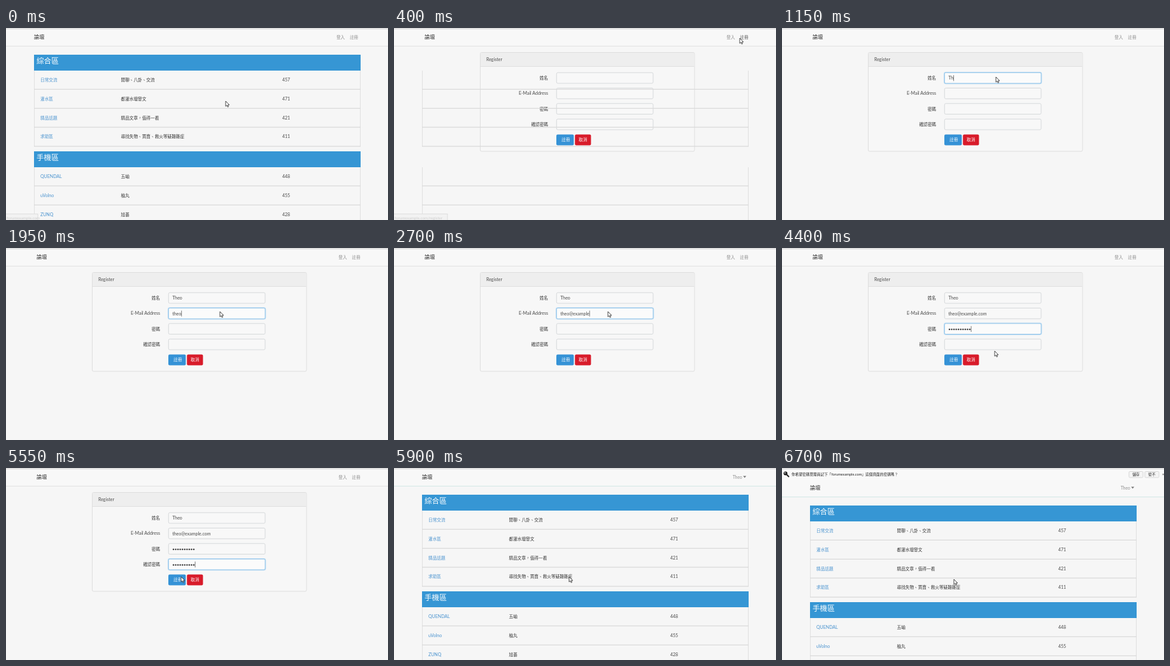
These frames come from a looping animation (600 px wide and 302 px high, 6750 ms). An HTML page:

```html
<!DOCTYPE html>
<html lang="zh-Hant">
<head>
<meta charset="utf-8">
<title>論壇</title>
<style>
html, body { margin: 0; width: 100%; height: 100%; overflow: hidden; background: #f6f6f6; }
svg { display: block; width: 600px; height: 302px; }
text { font-family: Lato, "Noto Sans CJK TC", "Noto Sans CJK", sans-serif; font-size: 7px; fill: #4a4a4a; white-space: pre; }
.zh { font-size: 6.65px; fill: #333; }
.link { fill: #4a93cf; }
.heading { font-size: 11.6px; fill: #fff; font-weight: 300; }
.brand { font-size: 8.2px; fill: #333; }
.nav { font-size: 6.6px; fill: #8d8d8d; }
.white { fill: #fff; }
.end { text-anchor: end; }
.rule { stroke: #dadada; stroke-width: 1.2; fill: none; }
.edge { stroke: #e0e0e0; stroke-width: 1; fill: none; }
.field { fill: #f8f8f8; stroke: #d3d6d9; stroke-width: .9; }
.ring { fill: none; stroke: #b9daf3; stroke-width: 2.6; }
.focus { fill: #fbfbfb; stroke: #8fc3e8; stroke-width: .9; }
.small { font-size: 5.7px; fill: #222; }
.status { font-size: 6.2px; fill: #cfcfcf; }
</style>
</head>
<body>
<svg id="stage" viewBox="0 0 600 302" xmlns="http://www.w3.org/2000/svg"></svg>
<script>
const LOOP = 6750, STEP = 50;
const USER = 'Theo', EMAIL = 'theo@example.com';
const PASSWORD_LENGTH = 10;

const text = (x, y, content, cls = '', id = '') =>
  `<text x="${x}" y="${y}" class="${cls}" id="${id}">${content}</text>`;
const rect = (x, y, w, h, attrs = '') =>
  `<rect x="${x}" y="${y}" width="${w}" height="${h}" ${attrs}/>`;
const line = (x1, y1, x2, y2, cls) =>
  `<path d="M${x1} ${y1}L${x2} ${y2}" class="${cls}"/>`;

// Forum index
const sections = [
  { title: '綜合區', top: 42, rows: [
    ['日常交流', '閒聊、八卦、交流', 457],
    ['灌水區', '都灌水壇發文', 471],
    ['精品話題', '精品文章，值得一看', 421],
    ['求助區', '尋找失物、買賣、救火等疑難雜症', 411]] },
  { title: '手機區', top: 194, rows: [
    ['QUENDAL', '五岫', 448],
    ['uVolno', '柚丸', 455],
    ['ZUNQ', '旭碁', 428]] }
];

const sectionFrame = ({ top, rows }) => {
  const bottom = top + 24.5 + rows.length * 29.9;
  return line(44.5, top + 25, 44.5, bottom, 'edge') +
    line(556.5, top + 25, 556.5, bottom, 'edge') +
    rows.map((_, i) => line(44, top + 24.5 + (i + 1) * 29.9, 557, top + 24.5 + (i + 1) * 29.9, 'rule')).join('');
};

const sectionBody = section => {
  const { title, top, rows } = section;
  return sectionFrame(section) +
    rect(44, top, 513, 25, 'fill="#3696d4"') +
    text(48, top + 14, title, 'heading') +
    rows.map(([name, about, posts], i) => {
      const y = top + 41.6 + i * 29.95;
      const latin = /^\w/.test(name);
      return text(54, y, name, latin ? 'link' : 'zh link') +
        text(180.5, y, about, 'zh') + text(434, y, posts);
    }).join('');
};

// Registration form
const fieldTops = [70.2, 94.5, 118.8, 143.2];
const labels = ['姓名', 'E-Mail Address', '密碼', '確認密碼'];

const formField = (top, i) =>
  text(242, top + 10.9, labels[i], i === 1 ? 'end' : 'zh end') +
  `<g id="ring${i}">${rect(255.3, top, 151.7, 16.8, 'rx="2" class="ring"')}</g>` +
  rect(255.3, top, 151.7, 16.8, `rx="2" class="field" id="box${i}"`) +
  (i < 2 ? text(261.2, top + 11, '', '', `value${i}`) : `<g id="value${i}"></g>`);

const form =
  rect(135.5, 38.5, 336.5, 155.5, 'rx="2" fill="#f7f7f7" stroke="#dedede"') +
  rect(136, 39, 335.5, 21.5, 'rx="1.5" fill="#eeeeee"') +
  line(136, 60.5, 471.5, 60.5, 'edge') +
  text(145, 51.8, 'Register') +
  fieldTops.map(formField).join('') +
  rect(255, 167.4, 27.4, 17.2, 'rx="2" fill="#3592d6"') + text(263, 178.4, '註冊', 'zh white') +
  rect(284.2, 167.4, 25.2, 17.2, 'rx="2" fill="#d81b2a"') + text(290, 178.4, '取消', 'zh white');

const passwordBar =
  rect(0, 2, 600, 17, 'fill="#f9f9f9"') +
  '<circle cx="5.5" cy="8.5" r="3" fill="#222"/><path d="M7 10l4 4" stroke="#222" stroke-width="2"/>' +
  '<circle cx="4.7" cy="7.7" r=".9" fill="#f9f9f9"/>' +
  text(15, 12.2, '你希望密碼管理員記下「forumexample.com」這個頁面的密碼嗎？', 'small') +
  [[545, '儲存'], [570, '從不']].map(([x, label]) =>
    rect(x, 5.5, 22, 9.5, 'rx="1.5" fill="#f5f5f5" stroke="#d0d0d0" stroke-width=".8"') +
    text(x + 5.3, 12.3, label, 'small')).join('') +
  text(597, 12.3, '×', 'small');

const stage = document.getElementById('stage');
stage.innerHTML =
  rect(0, 0, 600, 302, 'fill="#f6f6f6"') +
  '<g id="page">' +
    rect(0, 2, 600, 26, 'fill="#f8f8f8"') +
    `<path id="navLine" d="M0 28.5H600" stroke="#e2e2e2"/>` +
    text(44, 17.3, '論壇', 'brand', 'brand') +
    `<g id="guest">${text(519, 16.6, '登入', 'nav')}${text(540, 16.6, '註冊', 'nav', 'signUp')}</g>` +
    `<g id="member">${text(532, 16.6, USER, 'nav')}<path d="M548.3 12.6h5l-2.5 2.8z" fill="#777"/></g>` +
    `<g id="forum">${sections.map(sectionBody).join('')}</g>` +
    `<g id="form">${form}</g>` +
    `<g id="ghost">${sections.map(sectionFrame).join('')}</g>` +
  '</g>' +
  `<g id="bar">${passwordBar}</g>` +
  rect(0, .6, 600, 1.3, 'fill="#d4d4d4"') +
  `<g id="status">${rect(-1, 292.5, 85, 11, 'id="statusBox" fill="#f2f2f2" stroke="#dedede"')}${text(1, 300.6, '', 'status', 'statusText')}</g>` +
  '<path id="caret" stroke="#444" stroke-width=".7"/>' +
  '<path id="pointer" d="M0 0V8.2L1.9 6.5L3.2 9.3L4.5 8.7L3.3 6H5.8Z" fill="#fff" stroke="#222" stroke-width=".8"/>';

const el = id => document.getElementById(id);
const show = (id, visible) => el(id).setAttribute('visibility', visible ? 'visible' : 'hidden');
const setText = (id, value) => { if (el(id).textContent !== value) el(id).textContent = value; };
const clamp = (v, lo, hi) => Math.min(hi, Math.max(lo, v));

// Pointer stops: time, x, y
const path = [
  [0, 345, 115], [50, 345, 115], [300, 543, 16], [450, 543, 16], [700, 380, 66],
  [900, 336, 77], [1500, 336, 77], [1650, 336, 100], [3000, 336, 100], [3200, 320, 125],
  [4200, 320, 125], [4400, 334, 162], [4600, 346, 149], [5250, 346, 149],
  [5500, 275, 171], [5950, 275, 171], [6100, 270, 175], [LOOP, 270, 175]
];

function pointerAt(t) {
  const i = path.findIndex((stop, k) => k > 0 && t <= stop[0]);
  const [t0, x0, y0] = path[i - 1], [t1, x1, y1] = path[i];
  const p = (t - t0) / (t1 - t0), e = p * p * (3 - 2 * p);
  return [x0 + (x1 - x0) * e, y0 + (y1 - y0) * e];
}

// Characters visible when `count` keys are pressed evenly from start to end
const typed = (t, start, end, count) =>
  t < start ? 0 : clamp(1 + Math.floor((t - start) / (end - start) * (count - 1)), 0, count);

function emailLength(t) {
  return t < 2100 ? typed(t, 1700, 1900, 4) : 4 + typed(t, 2100, 2950, EMAIL.length - 4);
}

function drawDots(i, count) {
  const cy = fieldTops[i] + 9.3;
  el('value' + i).innerHTML = Array.from({ length: count }, (_, k) =>
    `<circle cx="${263 + k * 3.55}" cy="${cy}" r="1.25" fill="#444"/>`).join('');
}

function drawForm(t) {
  const starts = [950, 1650, 3250, 4600];
  const active = starts.filter(s => t >= s).length - 1;
  const name = USER.slice(0, typed(t, 1050, 1350, USER.length));
  const email = EMAIL.slice(0, emailLength(t));
  const dots = [typed(t, 3600, 4200, PASSWORD_LENGTH), typed(t, 4750, 5250, PASSWORD_LENGTH)];
  setText('value0', name);
  setText('value1', email);
  drawDots(2, dots[0]);
  drawDots(3, dots[1]);
  fieldTops.forEach((_, i) => {
    el('ring' + i).style.display = i === active ? '' : 'none';
    el('box' + i).setAttribute('class', i === active ? 'focus' : 'field');
  });
  show('caret', active >= 0);
  if (active < 0) return;
  const width = active < 2 ? el('value' + active).getComputedTextLength() : dots[active - 2] * 3.55;
  const y = fieldTops[active] + 4;
  el('caret').setAttribute('d', `M${261.6 + width} ${y}v9.2`);
}

function draw(t) {
  const onForm = t >= 350 && t < 5900;
  const signedIn = t >= 5900;
  const barOpen = t >= 6050;
  const shown = (id, visible) => { el(id).style.display = visible ? '' : 'none'; };

  shown('forum', !onForm);
  shown('form', onForm);
  shown('ghost', t >= 350 && t < 550);
  shown('guest', !signedIn);
  shown('member', signedIn);
  shown('bar', barOpen);
  el('page').setAttribute('transform', `translate(0 ${barOpen ? 17 : 0})`);
  el('navLine').setAttribute('stroke', signedIn ? '#d3e8e6' : '#e2e2e2');
  el('brand').setAttribute('x', onForm ? 48 : 44);
  el('guest').setAttribute('transform', `translate(${onForm ? 3.3 : 0} 0)`);
  el('signUp').style.fill = t >= 300 && t < 500 ? '#555' : '';

  const hovering = t >= 250 && t < 550;
  shown('status', t < 50 || hovering);
  el('statusBox').setAttribute('width', hovering ? 85 : 51);
  setText('statusText', hovering ? 'forumexample.com/register' : 'forumexample.com');

  if (onForm) drawForm(t); else show('caret', false);
  const [x, y] = pointerAt(t);
  el('pointer').setAttribute('transform', `translate(${x} ${y})`);
}

const began = performance.now();
function tick() {
  const t = (performance.now() - began) % LOOP;
  draw(Math.floor(t / STEP) * STEP);
  requestAnimationFrame(tick);
}
tick();
</script>
</body>
</html>
```
